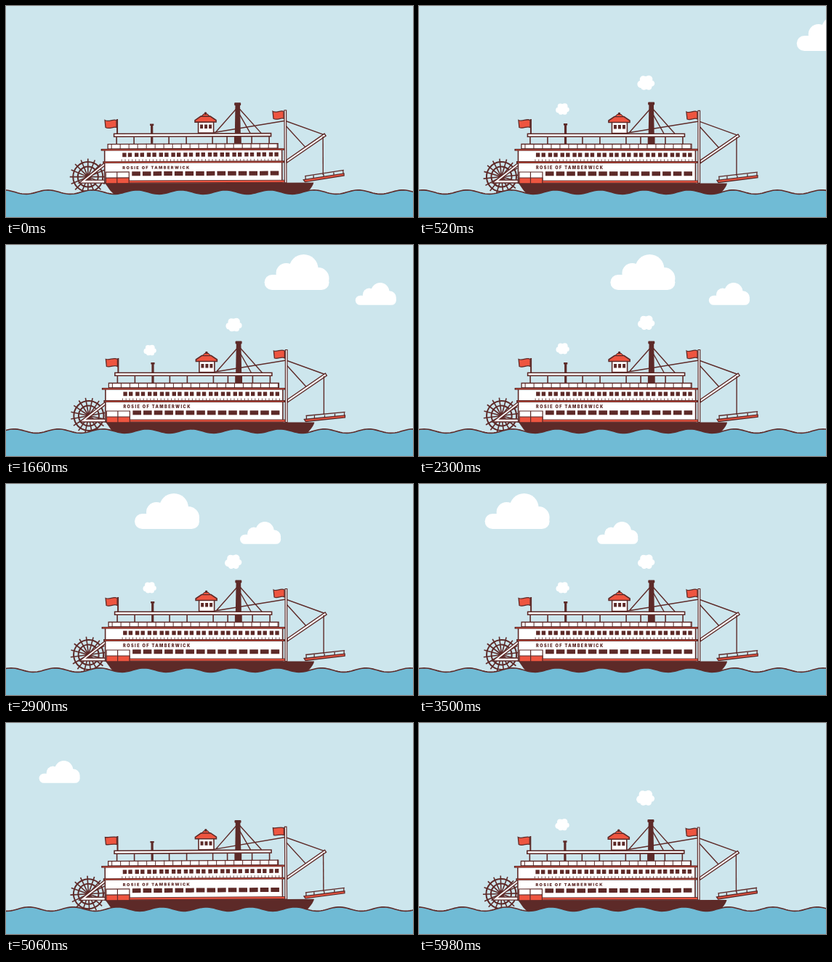
These frames come from a looping animation (560x291 px, 6 s). An HTML page:

```html
<!DOCTYPE html>
<html lang="en">
<head>
<meta charset="utf-8">
<title>Paddle steamer</title>
<style>
  html, body { margin: 0; width: 100%; height: 100%; overflow: hidden; background: #cde6ed; }
  svg { display: block; width: 100%; height: 100%; }
  .line { fill: none; }
  .ink { fill: #5d2a28; stroke: none; }
  .red { fill: #ee5540; }
  .trim { stroke: #ee5540; stroke-width: .8; }
  text { font: 900 5.6px Inter, Arial, sans-serif; letter-spacing: 1.4px; }
</style>
</head>
<body>
<svg viewBox="0 0 560 291">
  <defs>
    <g id="cloud" fill="#fff">
      <rect y="28" width="89" height="21" rx="10.5"/>
      <circle cx="30" cy="26" r="14"/>
      <circle cx="54" cy="20" r="20"/>
      <circle cx="74" cy="33" r="15"/>
    </g>
    <g id="puff" fill="#fff">
      <circle r="9.500"/>
      <circle cx="-7" cy="2" r="5.5"/><circle cx="-4" cy="-5" r="5"/>
      <circle cx="4" cy="-5" r="5.5"/><circle cx="8" cy="1" r="4.5"/>
      <circle cx="4" cy="6" r="4.5"/><circle cx="-3" cy="6" r="4.5"/>
    </g>
  </defs>
  <use id="big" href="#cloud"/>
  <use id="small" href="#cloud"/>
  <use id="puffA" href="#puff"/>
  <use id="puffB" href="#puff"/>

  <g id="boat" stroke="#5d2a28" stroke-width="1.6" fill="#fff">
    <g id="wheel" class="line"></g>
    <path d="M138 215 101 244h37v-4h-27l27-21z" stroke-width="1.3"/>

    <!-- rigging -->
    <path class="line" d="M319 141 289 175M321 141l31 35M320 146l17 30M287 175l98-16 55 20M386 166l28 31" stroke-width="1.4"/>
    <path d="M387 213 439 177l2 3-54 37z" stroke-width="1.4"/>
    <path class="line" d="M437 181v53" stroke-width="1.4"/>
    <g id="plank">
      <path class="line" d="M412 235.500 466 229.500M413 236v5M424 235v5M438 234v4M452 232v4M465 230v5" stroke-width="1.3"/>
      <path class="red" d="M410 240.500 466 234v3l-54 6.500z" stroke-width="1.3"/>
    </g>

    <!-- upper deck -->
    <path class="line" id="posts"/>
    <path d="M141 190.500h234v6.500H141z" stroke-width="1.3"/>
    <path class="line" id="rail" stroke-width="1"/>
    <g id="stackA" class="ink">
      <path d="M316.500 135h6.500l1 55h-8.500z"/>
      <rect x="315.200" y="132.500" width="9" height="4" rx="1"/>
      <rect x="314.800" y="178" width="9.800" height="12"/>
    </g>
    <g id="stackB" class="ink">
      <rect x="200" y="163" width="3.200" height="27"/>
      <rect x="199" y="162" width="5.200" height="2.500"/>
    </g>
    <rect x="149.500" y="176.300" width="216" height="4"/>
    <rect x="265.500" y="160" width="21" height="15.500"/>
    <path class="red" d="M261 160.500v-2.500l8-5.500h13l8 5.500v2.500z"/>
    <path class="red" d="M270 152.500l3-3h5l3 3z" stroke-width="1"/>
    <circle class="ink" cx="275.500" cy="148.500" r="1.800"/>
    <g id="cabin" class="ink"></g>

    <!-- main decks -->
    <rect x="136.500" y="198" width="244" height="46"/>
    <path class="line" d="M131.500 198.300h253M134 215.500h250" stroke-width="2.800"/>
    <path class="line trim" d="M133 198.500h250M136 215.700h246"/>
    <g id="upper" class="ink"></g>
    <path class="line" id="ticks" stroke-width=".8"/>
    <text class="ink" x="161" y="225">ROSIE OF TAMBERWICK</text>
    <g id="lower" class="ink"></g>
    <rect x="138" y="229" width="32" height="15" stroke-width="1.2"/>
    <rect class="red" x="138" y="237" width="32" height="8" stroke-width="1.2"/>
    <path class="line" d="M153.500 229v16" stroke-width="1.2"/>
    <rect class="red" x="170" y="241" width="214" height="3" stroke-width=".9"/>
    <path class="ink" d="M137 244.500h287q-1 6-12 17l-10 8H165q-15-8-21-15z"/>

    <!-- mast and flags -->
    <rect x="384" y="144.500" width="2.600" height="100" stroke-width="1.2"/>
    <path class="line" d="M154 156v20" stroke-width="2"/>
    <path class="red" id="flagA" stroke-width="1.3"/>
    <path class="red" id="flagB" stroke-width="1.3"/>
  </g>
  <path id="water" fill="#70bbd5" stroke="#5d2a28" stroke-width="1.6"/>
</svg>
<script>
const $ = id => document.getElementById(id);
const set = (id, name, value) => $(id).setAttribute(name, value);
const move = (id, value) => set(id, 'transform', value);
const list = (n, fn) => Array.from({ length: n }, (_, i) => fn(i)).join('');
const rect = (x, y, w, h) => `<rect x="${x}" y="${y}" width="${w}" height="${h}"/>`;

const LOOP = 6000, BEAT = 600, TAU = Math.PI * 2, WAVE = 61, SPOKES = 16;

$('cabin').innerHTML = list(3, i => rect(268 + i * 6, 164, 4, 5.5));
$('upper').innerHTML = list(13, i => rect(161 + i * 16.8, 202.5, 5.4, 5.7) + rect(168.6 + i * 16.8, 202.5, 5.4, 5.7));
$('lower').innerHTML = list(14, i => rect(174 + i * 14.65, 228.3, 11.6, 6));
$('wheel').innerHTML = '<circle r="20.5" stroke-width="2"/><circle r="14" stroke-width="2"/><circle class="ink" r="4"/>' +
  list(SPOKES, i => `<path d="M0 0V-25" transform="rotate(${i * 360 / SPOKES})"/>`);
set('posts', 'd', [153, 177, 225, 249, 285, 305, 339, 363].map(x => `M${x} 180v17`).join(''));
set('rail', 'd', list(20, i => `M${146 + i * 12} 190v7`));
set('ticks', 'd', list(46, i => `M${160 + i * 4.8} 211.500v3`));

function flag(id, x, y, w, h, phase) {
  const a = 1.2 * Math.sin(phase), b = 1.2 * Math.cos(phase);
  set(id, 'd', `M${x} ${y}c${-w / 3} ${-2 + a} ${-w * 2 / 3} ${2 + b} ${-w} 0` +
    `l1 ${h}c${w / 3} ${2 + b} ${w * 2 / 3} ${-2 + a} ${w - 1} 0z`);
}

function puff(id, x, y, dx, dy, size, p) {
  const u = (p - 270) / 330;
  set(id, 'visibility', u > 0 ? 'visible' : 'hidden');
  if (u <= 0) return;
  const e = 1 - (1 - u) ** 1.6;
  move(id, `translate(${x + dx * e} ${y + dy * e}) scale(${size * (0.55 + 0.45 * e)})`);
}

function wave(shift) {
  let d = 'M-5 300';
  for (let x = -5; x <= 565; x += 3)
    d += `L${x} ${256.6 - 2.8 * Math.cos((x - 58 + shift) / WAVE * TAU)}`;
  return d + 'L565 300z';
}

// Smooth 0..1..0 pulse once per beat, highest at the given time.
const pulse = (p, peak) => (1 + Math.cos((p - peak) / BEAT * TAU)) / 2;

function draw(now) {
  const t = now % LOOP, p = t % BEAT, beat = p / BEAT;
  const sway = pulse(p, 90), lift = pulse(p, 150) ** 2;
  const squash = 1 - 0.09 * lift;
  const stack = `translate(0 ${190 * (1 - squash)}) scale(1 ${squash})`;

  move('big', `translate(${445 - 0.144 * (t - 1040)} 13)`);
  move('small', `translate(${399 - 0.128 * (t - 2300)} 52) scale(.63)`);
  puff('puffA', 319.5, 131, -8, -28, 1, p);
  puff('puffB', 201.5, 160, -4.5, -20, 0.78, p);

  move('boat', `translate(${0.6 - 1.6 * sway} 0) rotate(${-0.73 * lift} 150 245)`);
  move('plank', `rotate(${1.5 - 4.5 * sway} 411 241)`);
  move('stackA', stack);
  move('stackB', stack);
  move('wheel', `translate(113.500 235.500) rotate(${beat * 720 / SPOKES})`);
  flag('flagA', 383, 146, 15, 10, beat * TAU);
  flag('flagB', 153, 157.5, 16, 10, beat * TAU);
  set('water', 'd', wave(beat * WAVE));
}

const start = performance.now();
function tick() {
  draw(performance.now() - start);
  requestAnimationFrame(tick);
}
tick();
</script>
</body>
</html>
```
